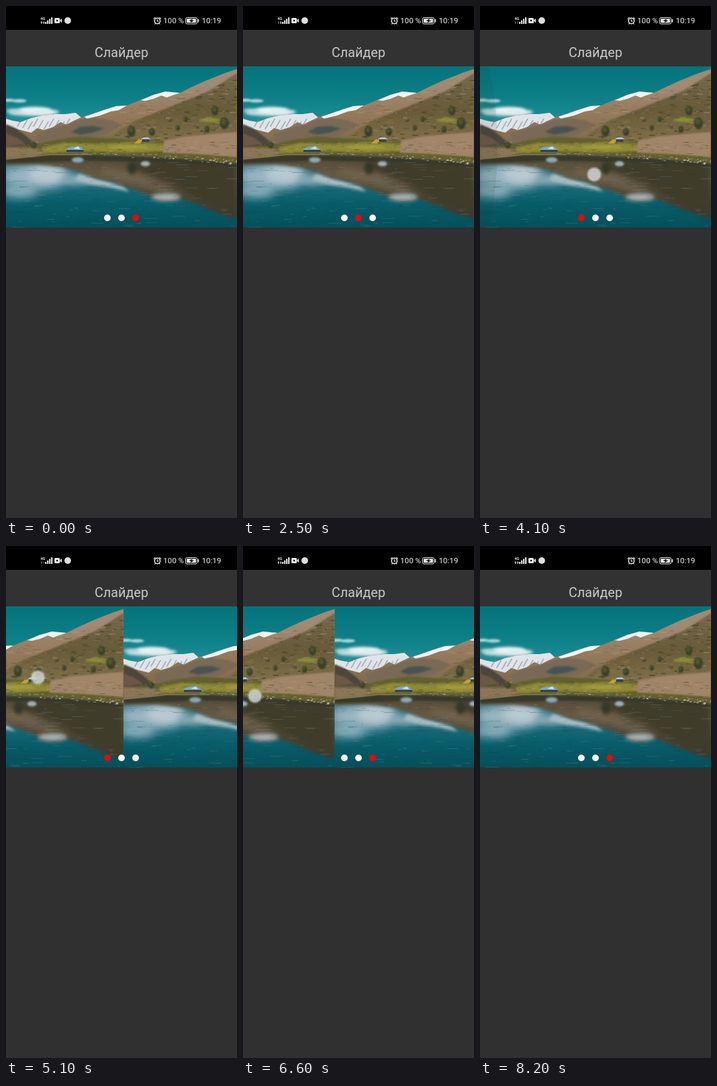
Write an HTML page with a canvas that moves like this. It is 348 px wide and 772 px high and loops after 8.6 s.

```html
<!DOCTYPE html>
<html lang="ru">
<head>
<meta charset="utf-8">
<title>Слайдер</title>
<style>
  html, body { margin: 0; width: 348px; height: 772px; overflow: hidden; background: #303030; }
  canvas { position: absolute; left: 0; top: 0; display: block; }
  span { position: absolute; white-space: pre; font-family: Roboto, "Noto Sans", sans-serif; }
  .bar { top: 14px; font-size: 11.7px; line-height: 17px; color: #f0f0f0; }
  .title { left: 0; width: 348px; top: 58px; text-align: center; font-size: 20px; line-height: 24px; color: #cacaca; }
</style>
</head>
<body>
<canvas id="stage" width="348" height="772"></canvas>
<span class="bar" style="left:237px">100 %</span>
<span class="bar" style="left:295px">10:19</span>
<span class="title">Слайдер</span>
<script>
const W = 348, H = 772, TOP = 91, BOTTOM = 334, LOOP = 8600, STEP = 100;
const ctx = document.getElementById('stage').getContext('2d');

let seed = 7;
const rnd = () => (seed = (seed * 16807) % 2147483647) / 2147483647;
const between = (a, b) => a + (b - a) * rnd();

function fill(g, color, d, blur = 0) {
  g.filter = blur ? `blur(${blur}px)` : 'none';
  g.fillStyle = color;
  g.fill(new Path2D(d));
  g.filter = 'none';
}

function blob(g, color, x, y, rx, ry, blur = 0) {
  g.filter = blur ? `blur(${blur}px)` : 'none';
  g.fillStyle = color;
  g.beginPath();
  g.ellipse(x, y, rx, ry, 0, 0, 7);
  g.fill();
  g.filter = 'none';
}

function shade(g, y0, y1, ...colors) {
  const s = g.createLinearGradient(0, y0, 0, y1);
  colors.forEach((c, i) => s.addColorStop(i / (colors.length - 1), c));
  return s;
}

// Short strokes scattered inside an outline
function flecks(g, outline, n, [x0, y0, x1, y1], colors, len, thick) {
  g.save();
  g.clip(new Path2D(outline));
  for (let i = 0; i < n; i++) {
    g.fillStyle = colors[i % colors.length];
    g.fillRect(between(x0, x1), between(y0, y1), between(1, len), between(.6, thick));
  }
  g.restore();
}

function paintSky(g) {
  g.fillStyle = shade(g, TOP, 190, '#04737b', '#0d8088', '#2c959c');
  g.fillRect(0, TOP, W, 150);
  blob(g, '#c9e0e4', 38, 161, 34, 5, 2);
  blob(g, '#edf3f5', 43, 157, 25, 5, 2);
  blob(g, '#dfeaec', 60, 160, 20, 4, 2);
  blob(g, '#b9dadd', 20, 143, 11, 2.5, 1.5);
  blob(g, '#cfe3e6', 4, 142, 8, 2, 1.5);
  blob(g, '#c2d8dc', 12, 158, 12, 3, 2);
}

function paintLand(g) {
  const range = 'M0 170L10 173L22 175L38 169L55 165L75 163L90 163L105 161L113 168L130 163L150 156L166 151L182 150L202 142L222 134L240 129L262 131L276 124L300 113L330 101L348 95V240H0Z';
  const slope = 'M348 101L328 114L306 128L282 138L262 146L240 155L218 164L196 172L172 187L150 202L170 214H348Z';
  fill(g, shade(g, 120, 215, '#a08a72', '#93795b', '#7d6947'), range);
  flecks(g, range, 260, [100, 125, 348, 210], ['#7c684c66', '#b2977a66', '#69593f66'], 14, 2.5);

  // Snow
  fill(g, '#dfe4e8', 'M0 170L10 173L22 175L38 169L55 165L75 163L90 163L105 161L113 168L100 174L91 179L82 175L70 183L57 187L47 184L38 191L22 187L0 181Z', .5);
  fill(g, '#f3f4f4', 'M118 167L150 156L166 151L182 150L170 157L158 159L142 165L122 170Z', .5);
  fill(g, '#f0f1f1', 'M203 142L222 134L240 129L262 131L250 135L242 138L234 135L222 140L210 143Z', .5);
  g.lineWidth = 1.5;
  g.strokeStyle = '#7d848c99';
  for (let i = 0; i < 10; i++) {
    const x = 24 + i * 8, y = 170 + i % 3 * 2;
    g.beginPath();
    g.moveTo(x, y);
    g.lineTo(x - 7, y + 12);
    g.stroke();
  }

  // Hills
  fill(g, '#7a6a55', 'M46 193L68 185L92 179L112 171L134 169L158 172L176 180L148 194L110 203L50 208Z', 1);
  fill(g, '#465350', 'M98 190L112 182L132 181L148 185L130 191L112 194Z', 1.5);
  fill(g, '#4c463b', 'M0 178L14 184L28 194L42 206L58 212H0Z', .8);
  fill(g, '#6b5846', 'M0 192L16 198L30 208L0 212Z', 1);
  fill(g, shade(g, 110, 205, '#73664b', '#685b39', '#80704a'), slope, .8);
  flecks(g, slope, 420, [155, 103, 348, 208], ['#4c462d88', '#958263aa', '#3f402999', '#7d763e99'], 10, 2.4);

  // Fields
  fill(g, '#61602e', 'M0 214L40 211L68 203L110 197L150 199L250 205L348 206V238H0Z', 1);
  fill(g, '#8f8a36', 'M54 213L88 206L138 208L188 205L240 208L236 219L186 221L120 219L54 222Z', 1.5);
  fill(g, '#a18569', 'M238 203L268 197L310 193L348 190V228L300 224L236 221Z', 1);
  fill(g, '#8d7557', 'M0 214L42 214L64 220L40 227L0 230Z', 1);
  blob(g, '#8a9230', 307, 172, 16, 3, 1.5);
  blob(g, '#a19a3a', 184, 213, 30, 3, 1);
  const meadow = 'M40 204H348V232H0V218Z';
  flecks(g, meadow, 200, [0, 204, 348, 230], ['#4f512b88', '#b19b7288', '#75713a88'], 9, 1.6);

  // Trees
  for (const [x, y, r] of [[189, 189, 8], [220, 190, 6], [315, 158, 7], [329, 177, 9], [303, 186, 5], [259, 184, 4], [271, 171, 4], [42, 210, 5]]) {
    blob(g, '#39402a', x, y, r * .75, r, 1);
    blob(g, '#53552f', x - 1, y - r * .3, r * .4, r * .5, 1);
  }

  // Houses
  fill(g, '#35414a', 'M91 216H117V220H91Z');
  fill(g, '#7ba6c3', 'M89 217L95 213L110 211L118 217Z');
  fill(g, '#d9e3e7', 'M101 215L109 212L112 216Z');
  fill(g, '#c3a22f', 'M193 207L200 201L207 202L202 207Z', .5);
  fill(g, '#3f4447', 'M205 201H216V205H205Z');
  fill(g, '#aebfc9', 'M203 201L207 198H214L218 201Z');
}

function paintWater(g) {
  const shore = 'M0 231L40 227L66 224L130 224L190 225L250 229L300 233L348 237V334H0Z';
  const mirror = 'M0 231L66 224L190 225L348 237V321L326 314L304 306L284 298L264 291L250 295L232 294L216 286L196 278L176 271L156 264L134 260L112 251L86 243L48 239L0 240Z';
  g.save();
  g.clip(new Path2D(shore));
  g.fillStyle = shade(g, 225, BOTTOM, '#42737c', '#216f7e', '#085d6a', '#04505b');
  g.fillRect(0, 220, W, 120);

  blob(g, '#9bb6c3', 44, 257, 52, 19, 8);
  blob(g, '#b8c9d1', 62, 254, 28, 13, 6);
  blob(g, '#8eb0bc', 20, 279, 28, 10, 7);
  blob(g, '#88a9b4', 108, 262, 26, 8, 5);
  fill(g, '#a7bcc1', 'M110 253L140 261L176 271L186 280L160 274L132 270L104 262Z', 2);
  fill(g, shade(g, 225, 318, '#544a37', '#665a43', '#4b4534', '#383a30'), mirror, 2);
  blob(g, '#a8b4b6', 241, 288, 22, 6, 3);
  fill(g, '#403c2a', 'M250 230L348 238V318L310 304L282 288L248 268L206 252L180 238Z', 5);
  fill(g, '#766650aa', 'M150 244L205 256L252 278L230 280L180 264L142 254Z', 4);
  fill(g, '#38392a', 'M0 231L66 225L130 225L230 229L348 237V243L230 236L120 233L0 237Z', 1.5);
  blob(g, '#8ba9b6', 108, 232, 9, 4, 1.5);
  blob(g, '#9fb0b6', 210, 238, 7, 4, 1.5);
  blob(g, '#343827', 190, 244, 7, 10, 2.5);

  flecks(g, shore, 300, [0, 234, 348, 334], ['#0c424c38', '#a5bdc32a', '#24403f38'], 20, 1.3);
  g.restore();

  // Stony bank
  flecks(g, 'M140 222L250 224L348 232V240L250 231L140 226Z', 160, [140, 221, 348, 240], ['#b3a187', '#77664e', '#d0c0a5'], 5, 2);
  g.lineWidth = 1.5;
  g.strokeStyle = '#a18c5e99';
  g.stroke(new Path2D('M0 231L40 227L66 224L130 224'));
}

const photo = document.createElement('canvas');
photo.width = W;
photo.height = BOTTOM - TOP;
const pg = photo.getContext('2d');
pg.translate(0, -TOP);
paintSky(pg);
paintLand(pg);
paintWater(pg);

// Page moves: start, passing point, end, with the page position at each
const moves = [
  [2000, 2, 2200, 1.42, 2500, 1],
  [2900, 1, 3100, 1 - 206 / W, 3500, 0],
  [4900, 0, 5100, 1 - 177 / W, 5500, 1],
  [6400, 1, 6600, 2 - 138 / W, 7000, 2]
];

// Finger traces as [time, x, y]
const traces = [
  [[2000, 107, 218], [2200, 300, 235]],
  [[2700, 69, 254], [2900, 69, 254], [3100, 262, 310]],
  [[3800, 90, 226], [4100, 172, 254], [4400, 308, 300], [4600, 308, 300]],
  [[4900, 225, 205], [5100, 48, 198]],
  [[6400, 235, 235], [6600, 18, 226]]
];

function pageAt(t) {
  let page = 2;
  for (const [t0, a, t1, m, t2, b] of moves) {
    if (t < t0) break;
    if (t < t1) page = a + (m - a) * ((t - t0) / (t1 - t0)) ** 1.3;
    else page = b + (m - b) * (1 - Math.min(1, (t - t1) / (t2 - t1))) ** 3;
  }
  return page;
}

function fingerAt(t) {
  for (const path of traces) {
    for (let i = 1; i < path.length; i++) {
      const [t0, x0, y0] = path[i - 1], [t1, x1, y1] = path[i];
      if (t < t0 || t > t1) continue;
      const k = (t - t0) / (t1 - t0);
      return [x0 + (x1 - x0) * k, y0 + (y1 - y0) * k];
    }
  }
  return null;
}

function drawStatus(t) {
  const g = ctx, white = '#f0f0f0';
  g.fillStyle = '#000';
  g.fillRect(0, 0, W, 36);

  g.fillStyle = white;
  g.font = 'bold 5.5px Roboto, sans-serif';
  g.fillText('4G', 52, 21);
  const lit = t < 1000 || (t >= 2900 && t < 3800) || t >= 5900;
  fill(g, lit ? white : '#777', 'M52 25L53.5 23L55 25H54V27H53V25Z');
  fill(g, lit || t < 2900 ? white : '#555', 'M55.5 25L57 27L58.5 25H57.5V23H56.5V25Z');
  g.fillStyle = white;
  for (let i = 0; i < 4; i++) g.fillRect(59 + i * 3, 24 - i * 2.3, 2, 3 + i * 2.3);

  g.beginPath();
  g.roundRect(73, 18, 8, 8, 1.5);
  g.fill();
  fill(g, white, 'M81.5 21L84 19V25L81.5 23Z');
  blob(g, '#000', 77, 22, 1.3, 1.3);
  blob(g, '#dedede', 93, 22, 5, 5);

  // Alarm clock
  g.strokeStyle = white;
  g.lineWidth = 1.5;
  g.beginPath();
  g.arc(228, 22.5, 4.2, 0, 7);
  g.stroke();
  g.lineWidth = 1.2;
  g.stroke(new Path2D('M228 20V23H230M222.5 19.5L225 17.2M233.5 19.5L231 17.2M225 26L224 27.5M231 26L232 27.5'));

  // Battery
  g.lineWidth = 1;
  g.beginPath();
  g.roundRect(270.5, 17.5, 17.5, 9.5, 2.2);
  g.stroke();
  g.fillStyle = white;
  g.fillRect(272.2, 19.2, 14, 6);
  g.fillRect(289, 20, 1.5, 4.5);
  fill(g, '#000', 'M275 22.5L281 19.5L280.3 21.7H284L278 25L278.7 22.5Z');
}

function draw(t) {
  ctx.fillStyle = '#303030';
  ctx.fillRect(0, 0, W, H);
  ctx.fillStyle = '#323232';
  ctx.fillRect(0, 36, W, TOP - 36);
  drawStatus(t);

  const page = pageAt(t);
  ctx.save();
  ctx.beginPath();
  ctx.rect(0, TOP, W, BOTTOM - TOP);
  ctx.clip();
  for (let i = 0; i < 3; i++) {
    const x = Math.round((i - page) * W);
    if (Math.abs(x) < W) ctx.drawImage(photo, x, TOP);
  }
  // Edge glow while pulling past the first page
  const pull = Math.max(0, 1 - Math.abs(t - 4250) / 450);
  if (pull) blob(ctx, `rgba(40,50,50,${.16 * pull})`, 0, 212, 26, 135);
  ctx.restore();

  for (let i = 0; i < 3; i++) {
    blob(ctx, i === Math.round(page) ? '#ee0508' : '#fff', 152.7 + i * 21.3, 319.5, 5, 5);
  }

  const finger = fingerAt(t);
  if (finger) {
    blob(ctx, 'rgba(225,235,235,.3)', ...finger, 11.5, 11.5);
    blob(ctx, 'rgba(214,216,214,.72)', ...finger, 9.5, 9.5);
  }
}

const begin = performance.now();
function tick() {
  const t = (performance.now() - begin) % LOOP;
  draw(Math.floor(t / STEP) * STEP);
  requestAnimationFrame(tick);
}
tick();
</script>
</body>
</html>
```
